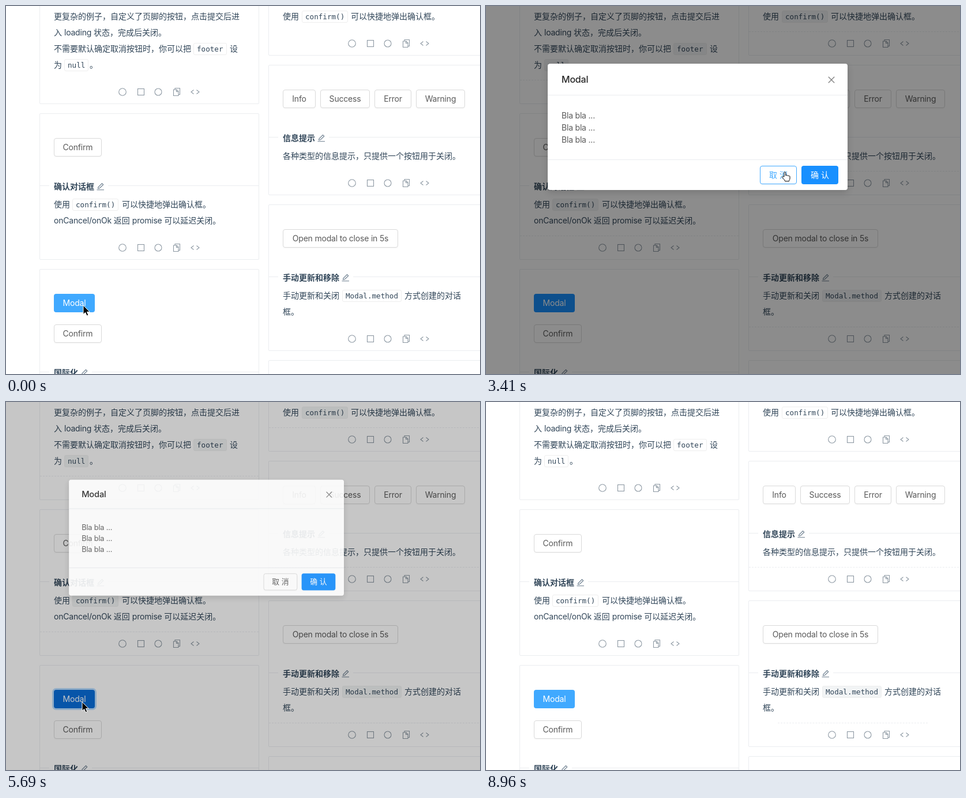
Animation, 822 px wide and 638 px high, one loop 9770 ms. Source, as an HTML page:

```html
<!DOCTYPE html>
<html lang="zh-CN">
<head>
<meta charset="utf-8">
<title>Modal demo</title>
<style>
html, body { margin: 0; width: 100%; height: 100%; overflow: hidden; background: #fff; }
body { position: relative; font: 14px/28px Inter, "Noto Sans CJK SC", "Noto Sans CJK", sans-serif; color: #314659; }
#page, #mask { position: absolute; inset: 0; overflow: hidden; }
#mask { background: #000; }
#page > *, #modal > * { position: absolute; box-sizing: border-box; white-space: nowrap; }
svg { position: absolute; overflow: visible; fill: none; }
i { font-style: normal; letter-spacing: -.2px; }
.title { font-weight: 600; background: #fff; padding: 0 8px; }
.card { border: 1px solid #ebedf0; border-radius: 2px; }
.line { height: 1px; background: #ebedf0; }
.dash { border-top: 1px dashed #ebedf0; visibility: hidden; }
.dim .dash, .dash.on { visibility: visible; }
code { height: 21px; padding: 0 5px; border: 1px solid #eee; border-radius: 3px; font: 12.6px/19px "DejaVu Sans Mono", monospace; }
.dim code, code.on { background: #f2f4f5; }
.btn { height: 32px; border: 1px solid #d9d9d9; border-radius: 4px; background: #fff; color: rgba(0,0,0,.65);
  line-height: 30px; text-align: center; box-shadow: 0 2px 0 rgba(0,0,0,.015); }
.primary { border: 0; line-height: 32px; background: #1890ff; color: #fff; }
.icons { stroke: #314659; stroke-width: 1.1; opacity: .55; }
.pen { stroke: #697b8c; stroke-width: 1.1; }
#modal { position: absolute; left: 107px; top: 100px; width: 520px; height: 219px; border-radius: 4px; background: #fff;
  box-shadow: 0 4px 12px rgba(0,0,0,.15); color: rgba(0,0,0,.65); transform-origin: 26px 420px; }
#modal .head { color: rgba(0,0,0,.85); font-size: 16px; font-weight: 500; }
#cursor { left: 0; top: 0; }
</style>
</head>
<body>
<div id="page"></div>
<div id="mask"></div>
<div id="modal"></div>
<svg id="cursor" width="20" height="20">
  <path id="arrow" d="M0 0V15.6L3.6 12.3 6.1 18 8.8 16.9 6.4 11.3H11.2Z" fill="#000" stroke="#fff"/>
  <path id="hand" transform="translate(-5 -1)" fill="#fff" stroke="#000" d="M4 9V2.2a1.4 1.4 0 0 1 2.8 0V7c.3-1.3 2.5-1 2.6.3.4-1 2.4-.7 2.4.6.5-.8 2.2-.4 2.2 1V12c0 2-1.5 3-1.5 4.8H5.6C5.2 14.5 2 12 .9 10.4c-.8-1.4.8-2.3 1.9-1.3Z"/>
</svg>
<script>
const $ = id => document.getElementById(id);
const LOOP = 9770;

// Markup helpers; y is the vertical centre for text, code and icons.
const latin = s => s.replace(/[A-Za-z.][\w\/ .]*/g, '<i>$&</i>');
const text = (x, y, s, cls = '') => `<span class="${cls}" style="left:${x}px;top:${y - 14}px">${latin(s)}</span>`;
const code = (x, y, s, id = '') => `<code id="${id}" style="left:${x}px;top:${y - 10.5}px">${s}</code>`;
const box = (cls, x, y, w, h = '', s = '', id = '') =>
  `<div id="${id}" class="${cls}" style="left:${x}px;top:${y}px;width:${w}px;${h && `height:${h}px`}">${latin(s)}</div>`;
const button = (x, y, w, s, cls = '', id = '') => box('btn ' + cls, x, y, w, '', s, id);
const icons = (x, y, id = '') => `<svg id="${id}" class="icons" width="146" height="16" style="left:${x - 8}px;top:${y - 8}px">
  <circle cx="8" cy="8" r="6.3"/><rect x="34.5" y="2.5" width="11" height="11"/><circle cx="70" cy="8" r="6"/>
  <path d="M99 4V1.5H107.5V12.5H105M96.5 4H102L105 7V14.5H96.5ZM101.5 4V7.5H105M131.5 4.5L127 8L131.5 11.5M136.5 4.5L141 8L136.5 11.5"/></svg>`;
const title = (x, y, w, s, chars) => box('line', x, y - 2, w) +
  `<span class="title" style="left:${x + 17}px;top:${y - 14}px;width:${chars * 14 + 32}px">${s}</span>` +
  `<svg class="pen" width="14" height="14" style="left:${x + 29 + chars * 14}px;top:${y - 7}px"><path d="M.5 12.8H13M2.5 10.4L3 8L9.5 1.5L11.7 3.7L5.2 10Z"/></svg>`;

$('page').innerHTML = [
  box('card', 58, -60, 381, 230), box('card', 58, 186, 381, 254), box('card', 58, 456, 381, 230),
  box('card', 455, -60, 381, 146), box('card', 455, 102, 381, 226), box('card', 455, 344, 381, 254), box('card', 455, 614, 381, 80),
  box('dash', 59, 128, 379), box('dash', 59, 398, 379), box('dash', 456, 44, 379),
  box('dash', 456, 286, 379, '', '', 'infoDash'), box('dash', 456, 556, 379),
  box('dash', 160, 398, 278, '', '', 'confirmDash'), box('dash', 506, 556, 260, '', '', 'updateDash'),

  text(83, 18, '更复杂的例子，自定义了页脚的按钮，点击提交后进'),
  text(83, 46, '入 loading 状态，完成后关闭。'),
  text(83, 74, '不需要默认确定取消按钮时，你可以把'), code(325, 74, 'footer'), text(388, 74, '设'),
  text(83, 102, '为'), code(101, 102, 'null'), text(145, 102, '。'), icons(202, 149),

  button(83, 229, 83, 'Confirm'), title(58, 313, 381, '确认对话框', 5),
  text(83, 344, '使用'), code(115, 344, 'confirm()'), text(201, 344, '可以快捷地弹出确认框。'),
  text(83, 372, 'onCancel/onOk 返回 promise 可以延迟关闭。'), icons(202, 419),

  button(83, 499, 71, 'Modal', 'primary', 'trigger'), button(83, 552, 83, 'Confirm'), title(58, 636, 381, '国际化', 3),

  text(480, 18, '使用'), code(513, 18, 'confirm()'), text(598, 18, '可以快捷地弹出确认框。'), icons(600, 65),

  button(480, 145, 57, 'Info'), button(545, 145, 86, 'Success'), button(639, 145, 64, 'Error'), button(711, 145, 85, 'Warning'),
  title(455, 229, 381, '信息提示', 4), text(480, 260, '各种类型的信息提示，只提供一个按钮用于关闭。'), icons(600, 307, 'infoIcons'),

  button(480, 387, 200, 'Open modal to close in 5s'), title(455, 471, 381, '手动更新和移除', 7),
  text(480, 502, '手动更新和关闭'), code(583, 502, 'Modal.method', 'methodCode'), text(691, 502, '方式创建的对话'),
  text(480, 530, '框。'), icons(600, 577)
].join('');

$('modal').innerHTML = [
  text(24, 27, 'Modal', 'head'), box('line', 0, 54, 520), box('line', 0, 166, 520),
  ...[90, 111, 132].map(y => text(24, y, 'Bla bla ...')),
  button(368, 177, 64, '取 消', '', 'cancel'), button(440, 177, 64, '确 认', 'primary'),
  '<svg width="12" height="12" style="left:486px;top:22px" stroke="#000" stroke-opacity=".5" stroke-width="1.3"><path d="M.8.8L11.2 11.2M11.2.8L.8 11.2"/></svg>'
].join('');

// The picture advances in steps: [start, end, intervals].
const steps = [
  [270, 570, 3], [810, 1170, 3], [1710, 1800, 1], [1980, 2870, 10], [2960, 3410, 5], [3710, 4040, 3],
  [4250, 4430, 2], [4430, 5040, 7], [5310, 5480, 2], [5690, 5810, 1], [5810, 6660, 8],
  [6870, 7280, 4], [7280, 7520, 2], [8090, 8960, 10]
];
function stepped(t) {
  const range = steps.findLast(([start]) => start <= t);
  if (!range) return 0;
  const [start, end, n] = range;
  return start + Math.min(n, Math.floor((t - start) / (end - start) * n + 1e-6)) / n * (end - start);
}

const clamp = v => Math.max(0, Math.min(1, v));
const between = (t, a, b) => t >= a && t < b;

// Linear interpolation through [time, ...values] keys.
function track(t, keys) {
  const next = keys.findIndex(k => k[0] > t);
  if (next < 1) return keys.at(next).slice(1);
  const a = keys[next - 1], b = keys[next], p = (t - a[0]) / (b[0] - a[0]);
  return a.slice(1).map((v, i) => v + (b[i + 1] - v) * p);
}

function bezier(x1, y1, x2, y2) {
  const curve = (u, a, b) => 3 * u * (1 - u) ** 2 * a + 3 * u * u * (1 - u) * b + u ** 3;
  return x => {
    let lo = 0, hi = 1;
    for (let i = 0; i < 24; i++) {
      const mid = (lo + hi) / 2;
      if (curve(mid, x1, x2) < x) lo = mid; else hi = mid;
    }
    return curve(lo, y1, y2);
  };
}
const zoomIn = bezier(.08, .82, .17, 1);
const zoomOut = bezier(.78, .14, .15, .86);

const pointer = [
  [0, 134, 519], [1170, 134, 519], [1710, 410, 340], [1800, 519, 268], [1890, 519, 268],
  [1980, 500, 275], [2160, 330, 390], [2340, 160, 510], [2430, 144, 519], [2600, 300, 400],
  [2780, 510, 214], [2870, 540, 238], [2960, 538, 246], [3140, 526, 276], [3410, 518, 288],
  [4160, 518, 288], [4340, 362, 397], [4430, 262, 457], [4517, 190, 500], [4604, 150, 518],
  [4778, 127, 521], [5040, 132, 520], [6020, 132, 520], [6240, 330, 400], [6450, 480, 308], [6660, 493, 299],
  [8003, 493, 299], [8177, 550, 180], [8270, 630, 98], [8360, 715, 130], [8450, 755, 220],
  [8540, 740, 340], [8700, 640, 480], [8870, 540, 600], [8960, 510, 645]
];
const hover = [64, 169, 255], active = [9, 109, 217], normal = [24, 144, 255], idle = [217, 217, 217], ink = [89, 89, 89];
const triggerKeys = [
  [0, ...hover], [200, ...hover], [570, ...active], [810, ...active], [1110, ...normal], [3710, ...normal], [4040, ...hover],
  [5250, ...hover], [5480, ...active], [5690, ...active], [5990, ...normal], [7058, ...normal], [7250, ...hover]
];
const cancelKeys = rest => [
  [0, ...rest], [3050, ...rest], [3350, ...hover], [3690, ...hover], [3800, ...active], [4100, ...rest],
  [6400, ...rest], [6640, ...hover], [6800, ...hover], [7000, ...active]
];
const rgb = c => `rgb(${c.map(Math.round)})`;

function render(t) {
  const [open, close] = t < 5000 ? [710, 3690] : [5590, 7058];
  const leave = clamp((t - close) / 300);
  const zoom = leave ? 1 - zoomOut(leave) : zoomIn(clamp((t - open) / 300));
  const dim = clamp((t - open) / 200) * (1 - leave);
  const shown = t > open && leave < 1;

  $('page').classList.toggle('dim', dim > 0);
  $('mask').style.opacity = .45 * dim;
  $('modal').style.visibility = shown ? 'visible' : 'hidden';
  $('modal').style.opacity = zoom;
  $('modal').style.transform = shown && zoom > .999 ? 'none' : `scale(${.2 + .8 * zoom})`;

  const ring = t > open ? .4 * (1 - clamp((t - open) / 400)) : 0;
  $('trigger').style.background = rgb(track(t, triggerKeys));
  $('trigger').style.boxShadow = `0 0 0 3px rgba(24,144,255,${ring})`;
  $('cancel').style.borderColor = rgb(track(t, cancelKeys(idle)));
  $('cancel').style.color = rgb(track(t, cancelKeys(ink)));

  $('infoIcons').style.opacity = track(t, [[0, .55], [3900, .55], [4040, .8], [4430, .8], [4700, .55], [7300, .55], [7520, .8], [8090, .8], [8360, .55]])[0];
  $('infoDash').classList.toggle('on', t > 3710);
  $('confirmDash').classList.toggle('on', between(t, 4040, 5690));
  $('updateDash').classList.toggle('on', t > 8700);
  $('methodCode').classList.toggle('on', t > 8700);

  const [x, y] = track(t, pointer);
  const hand = between(t, 3140, 3800) || between(t, 6400, 7058);
  $('cursor').style.transform = `translate(${Math.round(x)}px, ${Math.round(y)}px)`;
  $('arrow').style.display = hand ? 'none' : '';
  $('hand').style.display = hand ? '' : 'none';
}

const began = performance.now();
function frame() {
  render(stepped((performance.now() - began) % LOOP));
  requestAnimationFrame(frame);
}
frame();
</script>
</body>
</html>
```
